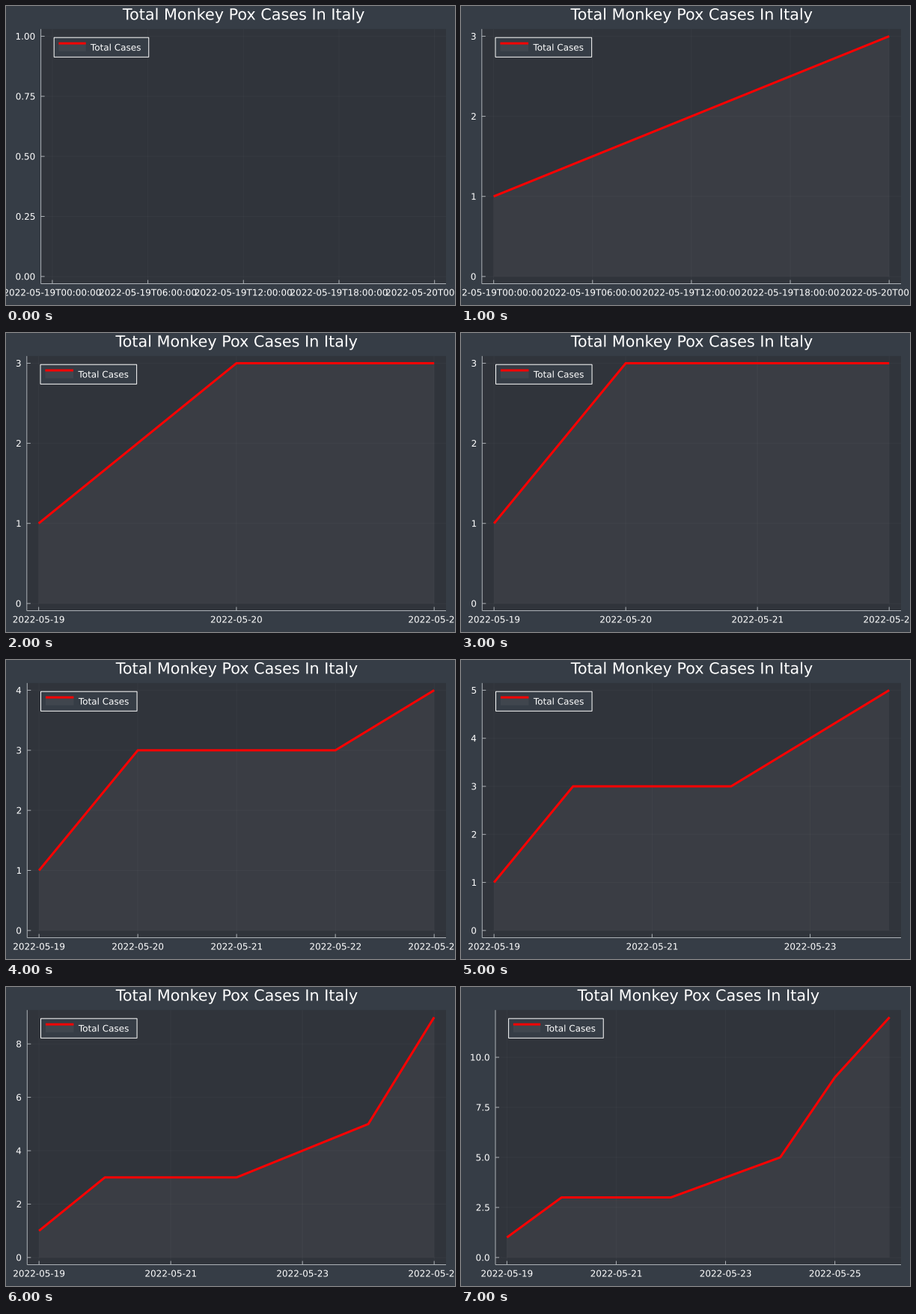
A matplotlib script for the animation above (8 s loop, 600 px wide and 400 px high).

```python
import matplotlib.pyplot as plt
from matplotlib.animation import FuncAnimation
from matplotlib.patches import PathPatch, Rectangle
from matplotlib.textpath import TextPath
from matplotlib.transforms import Affine2D
import numpy as np

WIDTH, HEIGHT, DPI = 600, 400, 100
PT = 72 / DPI  # points per pixel

CASES = [1, 3, 3, 3, 4, 5, 9, 12]
Y_STEPS = [0.25, 1, 1, 1, 1, 1, 2, 2.5]
HOUR_STEPS = [6, 6, 24, 24, 24, 48, 48, 48]
LEFTS = [46.6, 27.8, 27.8, 28.3, 28.3, 28.3, 28.3, 46.0]

TOP, RIGHT, BOTTOM = 30.8, 588, 371.5
PAD = 0.03 / 1.06  # margin on each side, as a share of the axis

BACK, INSIDE = "#363D46", "#30343B"
AXIS, TEXT, LINE = "#ADB2B7", "#FFFFFF", "#FF0000"
FILL = dict(facecolor="#FFF0F0", alpha=0.052, linewidth=0)

plt.rcParams.update({"font.family": "DejaVu Sans", "path.snap": False})
fig = plt.figure(figsize=(WIDTH / DPI, HEIGHT / DPI), dpi=DPI, facecolor=BACK)
ax = fig.add_axes([0, 0, 1, 1])


def scale(value, span, start, end):
    """Map 0..span onto the padded stretch from start to end."""
    pad = (end - start) * PAD
    return start + pad + value / span * (end - start - 2 * pad)


def stroke(xs, ys, color, width=1.0, **kw):
    ax.plot(xs, ys, color=color, lw=width * PT, solid_capstyle="butt", **kw)


def write(x, y, text, size=12, align=0.5):
    """Unhinted text on baseline y; align 0 is left, 1 is right."""
    path = TextPath((0, 0), text, size=size)
    box = path.get_extents()
    shift = x - box.x0 - align * box.width
    flip = Affine2D().scale(1, -1).translate(shift, y)
    ax.add_patch(PathPatch(path.transformed(flip), facecolor=TEXT, lw=0, zorder=7))


def y_label(value, step):
    digits = {0.25: 2, 2.5: 1}.get(step, 0)
    return f"{value:.{digits}f}"


def x_label(hours, step):
    day, hour = divmod(int(hours), 24)
    date = f"2022-05-{19 + day}"
    return date if step >= 24 else f"{date}T{hour:02d}:00:00"


def legend(left):
    w = RIGHT - left
    x = left + 0.0325 * w
    gap = 0.0115 * w
    ax.add_patch(Rectangle((x, 42.2), left + 67 + 0.1425 * w - x, 26.1,
                           facecolor=BACK, edgecolor=TEXT, lw=PT, zorder=4))
    x0 = x + gap
    x1 = x0 + 0.067 * w
    ax.add_patch(Rectangle((x0, 50), x1 - x0, 10.6, zorder=5, **FILL))
    stroke([x0, x1], [50, 50], LINE, 3, zorder=6)
    write(x1 + gap, 59.6, "Total Cases", align=0)


def draw(i):
    ax.cla()
    ax.set(xlim=(0, WIDTH), ylim=(HEIGHT, 0))
    ax.axis("off")

    left = LEFTS[i]
    days, top = max(i, 1), max(CASES[:i + 1])
    y_step, h_step = Y_STEPS[i], HOUR_STEPS[i]

    def px(day):
        return scale(day, days, left, RIGHT)

    def py(value):
        return scale(value, top, BOTTOM, TOP)

    ax.add_patch(Rectangle((left, TOP), RIGHT - left, BOTTOM - TOP,
                           facecolor=INSIDE, lw=0, zorder=0))

    for hours in np.arange(0, days * 24 + 1, h_step):
        x = px(hours / 24)
        stroke([x, x], [TOP, BOTTOM], AXIS, alpha=0.05, zorder=1)
        stroke([x, x], [BOTTOM - 5, BOTTOM], AXIS, zorder=3)
        write(x, 387.5, x_label(hours, h_step))

    for value in np.arange(0, top + 1e-6, y_step):
        y = py(value)
        stroke([left, RIGHT], [y, y], AXIS, alpha=0.05, zorder=1)
        stroke([left, left + 5], [y, y], AXIS, zorder=3)
        write(left - 8.2, y + 4.4, y_label(value, y_step), align=1)

    stroke([left, left], [TOP, BOTTOM], AXIS, zorder=3)
    stroke([left, RIGHT], [BOTTOM, BOTTOM], AXIS, zorder=3)

    if i > 0:
        xs = px(np.arange(i + 1))
        ys = py(np.array(CASES[:i + 1]))
        ax.fill_between(xs, ys, py(0), zorder=2, **FILL)
        stroke(xs, ys, LINE, 3, zorder=3.5)

    legend(left)
    write((left + RIGHT) / 2, 18.4, "Total Monkey Pox Cases In Italy", 20.75)


anim = FuncAnimation(fig, draw, frames=len(CASES), init_func=lambda: None,
                     interval=1000, repeat=True, repeat_delay=0)
plt.show()
```
